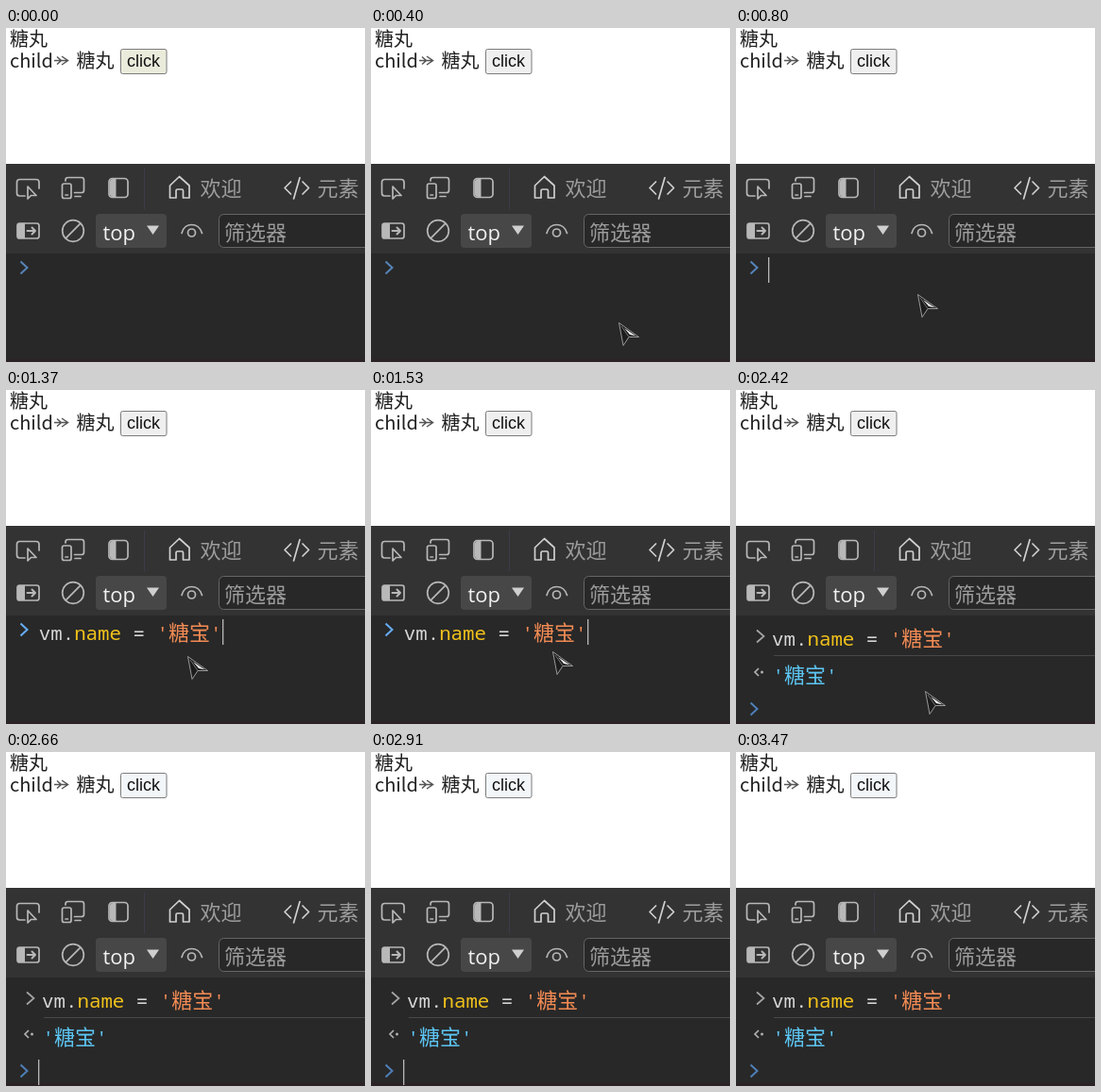
An HTML page for the animation above (3.88 s loop, 380 by 354 pixels).

```html
<!DOCTYPE html>
<html lang="zh-CN">
<head>
<meta charset="utf-8">
<title>Console demo</title>
<style>
  html, body { margin: 0; width: 100%; height: 100%; overflow: hidden; background: #fff; }
  svg { display: block; width: 380px; height: 354px; }
  text { white-space: pre; font-family: "Noto Sans CJK SC", "Noto Sans CJK", sans-serif; font-size: 22px; }
  .page { font-size: 20px; fill: #222; }
  .btn { font: 18px "Liberation Sans", Arial, sans-serif; fill: #111; }
  .top { font-family: "Open Sans", "Noto Sans", sans-serif; font-weight: 500; fill: #f2f2f2; }
  .tab { fill: #9c9c9c; }
  .mono { font-family: "Noto Sans Mono", "Noto Sans CJK SC", monospace; font-size: 20.8px; font-weight: 500; }
  .cjk { font-family: "Noto Sans CJK SC", "Noto Sans CJK", sans-serif; font-size: 22px; font-weight: 400; }
  .icon { fill: none; stroke: #b8b8b8; stroke-width: 1.7; stroke-linecap: round; stroke-linejoin: round; }
  .solid { fill: #b8b8b8; stroke: none; }
  .str { fill: #f28b54; }
  .out { fill: #5cc5f2; }
</style>
</head>
<body>
<svg viewBox="0 0 380 354">
  <rect width="380" height="354" fill="#fff"/>
  <text class="page" x="4" y="19">糖丸</text>
  <text class="page" x="4" y="42">child</text>
  <path d="M51 34.500H65M54 30.500L58.500 34.500L54 38.500M59 30L65.500 34.500L59 39" fill="none" stroke="#555" stroke-width="1.500"/>
  <text class="page" x="74.5" y="42">糖丸</text>
  <rect id="btn" x="121.5" y="22.5" width="48.5" height="26" rx="2" stroke="#7b7b7b"/>
  <text class="btn" x="128" y="41">click</text>

  <path d="M0 144H4L380 144V354H0Z" fill="#333334"/>
  <rect y="239" width="380" height="112" fill="#282828"/>
  <rect y="351" width="380" height="3" fill="#2b2226"/>
  <path d="M146.500 149V192" stroke="#3d3d4a"/>

  <g class="icon">
    <path d="M20 178H14.500Q11.500 178 11.500 175V163.500Q11.500 160.500 14.500 160.500H32Q35 160.500 35 163.500V170"/>
    <path d="M23 168V181L26.500 177.500H32Z"/>
    <path d="M63 162V161Q63 158.500 65.500 158.500H80Q82.500 158.500 82.500 161V172Q82.500 174.500 80 174.500H72.500M73 178.500H79"/>
    <rect x="59.500" y="165" width="9.500" height="15.500" rx="2"/>
    <path d="M63 177H65.500"/>
    <rect x="109" y="159.500" width="20" height="20" rx="3.500"/>
    <path d="M113 160H116.500V179H113Q110 179 110 176V163Q110 160 113 160Z" class="solid"/>
    <path d="M173.500 180V167L183.500 157.500L194 167V180H187.500V172.500Q187.500 171 186 171H181.500Q180 171 180 172.500V180Z" stroke="#d0d0d0"/>
    <path d="M301.500 163L295 169.500L301.500 176M314 163L320.500 169.500L314 176M311 158.500L304.500 181" stroke="#d0d0d0"/>
    <rect x="12" y="207" width="23" height="16" rx="2.500"/>
    <path d="M14 207H20V223H14Q12 222.500 12 220.500V209.500Q12 207.500 14 207Z" class="solid"/>
    <path d="M22.500 215H31M27.500 211.500L31 215L27.500 218.500" stroke-width="2"/>
    <circle cx="71" cy="215" r="11.300"/>
    <path d="M63.200 222.800L78.800 207.200"/>
    <path d="M186 217.500C189 205.500 204 205.500 207.500 217.500"/>
    <circle cx="196.500" cy="217" r="4"/>
  </g>
  <text class="tab" x="205.500" y="178">欢迎</text>
  <text class="tab" x="329.500" y="178">元素</text>
  <rect x="95" y="197" width="75" height="36" rx="4" fill="#474747"/>
  <text class="top" x="102.500" y="224.500">top</text>
  <path d="M149 209.500H162L155.500 219Z" fill="#cfcfcf"/>
  <rect x="225.500" y="197.500" width="170" height="35" rx="5" fill="#282828" stroke="#666"/>
  <text class="tab" x="231" y="225">筛选器</text>

  <g id="code">
    <text class="mono" x="0" y="0" fill="#d6d6d6">vm.<tspan fill="#f2c21b">name</tspan> = <tspan class="str">'<tspan class="cjk">糖宝</tspan>'</tspan></text>
  </g>
  <path id="sent" d="M22 254.500L29.500 261L22 267.500" fill="none" stroke="#a5a5a5" stroke-width="1.700"/>
  <g id="result">
    <path d="M40 281.500H380" stroke="#484848"/>
    <path d="M24 295L20 299L24 303" fill="none" stroke="#b0b0b0" stroke-width="1.700"/>
    <circle cx="27.500" cy="299" r="1.500" fill="#b0b0b0"/>
    <text class="mono out" x="38.500" y="309.500">'<tspan class="cjk">糖宝</tspan>'</text>
  </g>
  <path id="prompt" d="M-3.500 -6.500L3.500 0L-3.500 6.500" fill="none" stroke-width="2"/>
  <rect id="caret" width="1.300" height="27" fill="#b9b9b9"/>
  <g id="pointer" stroke-linejoin="round">
    <path d="M.5 .5L21.500 15.500L11 15.500L5 24.500Z" fill="#1c1c1c" stroke="#a8a8a8" stroke-width=".9"/>
    <path d="M3 4L11 15.500" stroke="#8a8a8a" stroke-width=".8"/>
    <path d="M6 6L18.500 14.500L12 13Z" fill="#f0f0f0"/>
  </g>
</svg>
<script>
const LOOP = 3880;
const el = id => document.getElementById(id);

// Each track: [start ms, value]; null hides the part.
const tracks = {
  pointer: [[0, null], [320, [322, 340]], [400, [262, 312]], [480, [214, 290]],
            [560, [192, 282]], [1450, [192, 277]], [2420, [200, 319]], [2500, null]],
  caret: [[0, null], [800, [34, 243]], [1370, [229, 243]], [2020, [34, 287]],
          [2100, null], [2660, [34, 326]], [3470, null]],
  code: [[0, null], [1370, [34.7, 265]], [2020, [38, 271]]],
  prompt: [[0, [19, 254]], [2020, [19, 299]], [2100, [19, 338]]],
  sent: [[0, null], [2020, [0, 0]]],
  result: [[0, null], [2100, [0, 0]]]
};
const fills = [[0, "#ebebdc"], [320, "#efefef"], [2660, "#f2f6f9"]];
const blues = [[0, "#5684b8"], [1370, "#66adf5"], [2020, "#4e7fb8"]];

function at(steps, t) {
  let value = steps[0][1];
  for (const [start, v] of steps) if (t >= start) value = v;
  return value;
}

function draw(now) {
  const t = now % LOOP;
  for (const id in tracks) {
    const pos = at(tracks[id], t);
    el(id).style.display = pos ? "" : "none";
    if (pos) el(id).setAttribute("transform", `translate(${pos})`);
  }
  el("btn").setAttribute("fill", at(fills, t));
  el("prompt").setAttribute("stroke", at(blues, t));
}

const begin = performance.now();
function tick() {
  draw(performance.now() - begin);
  requestAnimationFrame(tick);
}
tick();
</script>
</body>
</html>
```
